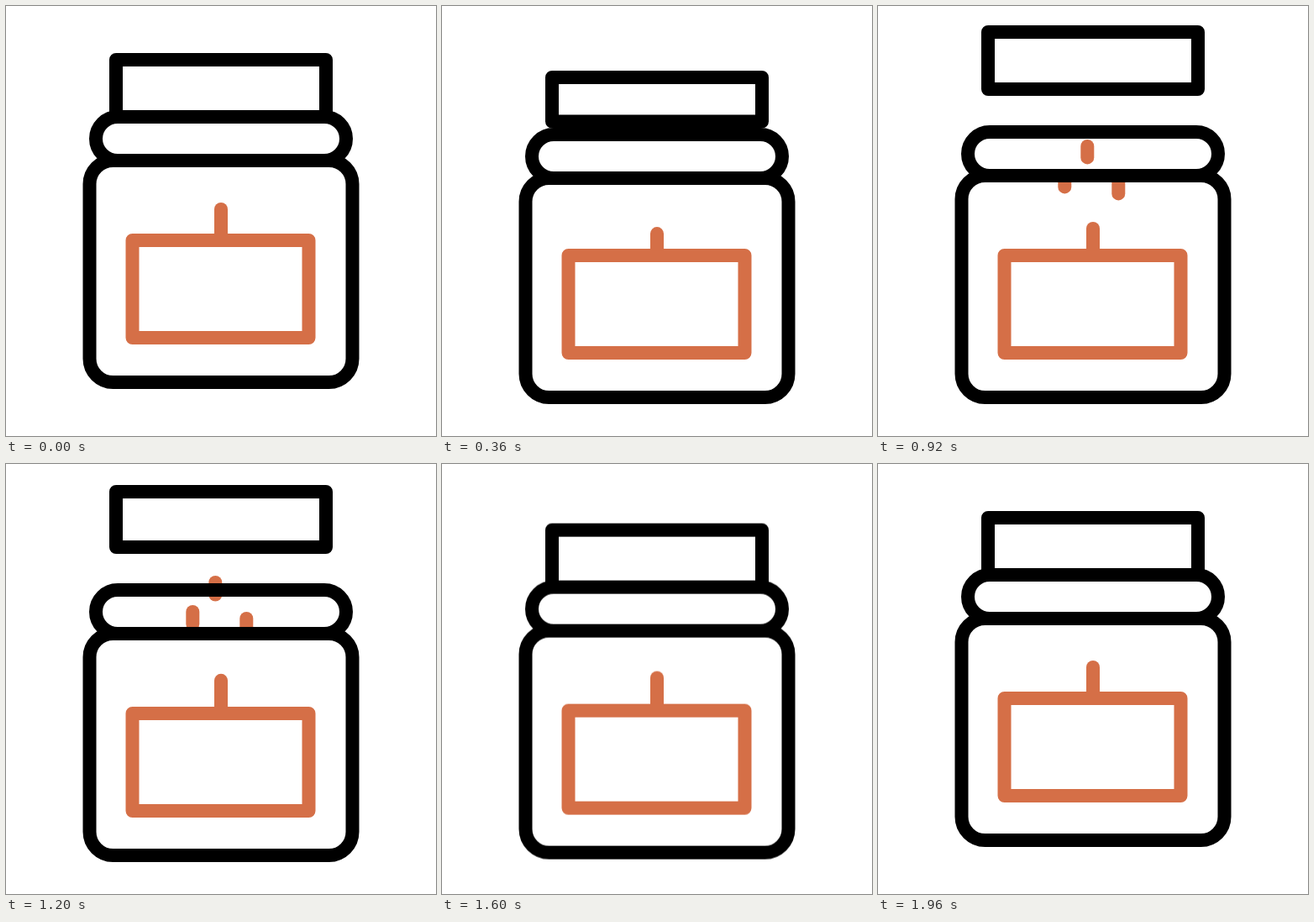
These frames come from a looping animation (512x512 px, 2 s). An HTML page:

```html
<!DOCTYPE html>
<html lang="en">
<head>
<meta charset="utf-8">
<title>Jar</title>
<style>
  @property --shift { syntax: "<length>"; inherits: true; initial-value: 0px; }
  @property --press { syntax: "<length>"; inherits: true; initial-value: 0px; }
  @property --lid-top { syntax: "<length>"; inherits: true; initial-value: 0px; }
  @property --lid-end { syntax: "<length>"; inherits: true; initial-value: 0px; }
  @property --wick { syntax: "<length>"; inherits: true; initial-value: 0px; }
  @property --head { syntax: "<length>"; inherits: true; initial-value: 0px; }
  @property --tail { syntax: "<length>"; inherits: true; initial-value: 0px; }

  html, body { margin: 0; width: 100%; height: 100%; overflow: hidden; background: #fff; }

  svg {
    --smooth: cubic-bezier(.37, 0, .63, 1);
    display: block;
    width: 100%;
    height: 100%;
    animation: 2s var(--smooth) infinite;
    animation-name: shift, press, lid-top, lid-end, wick, head, tail;
  }

  .all { transform: translateY(var(--shift)); }
  .line { fill: none; stroke: #000; stroke-width: 16; stroke-linejoin: round; }
  .orange { stroke: #d56f47; }
  .solid { fill: #d56f47; }

  .lid {
    y: calc(64px + var(--lid-top));
    height: calc(68px + var(--lid-end) - var(--lid-top));
  }
  .neck { y: calc(132px + var(--press)); }
  .body {
    y: calc(184px + var(--press));
    height: calc(264px - var(--press));
  }
  .wick {
    y: calc(234px + var(--wick));
    height: calc(45px - var(--wick));
  }
  .drop {
    y: calc(var(--base) - 8px - var(--head));
    height: calc(16px + var(--head) - var(--tail));
  }
  .drops { opacity: 0; animation: show 2s step-end infinite; }

  /* The whole jar sinks, then rises back */
  @keyframes shift {
    0%, 89.5%, 100% { --shift: 0px; }
    12%, 76.25% { --shift: 18px; }
  }
  /* Squash of the glass before the lid pops */
  @keyframes press {
    0%, 21%, 100% { --press: 0px; }
    12% { --press: 12.5px; }
  }
  /* The two edges of the lid move apart in time */
  @keyframes lid-top {
    0%, 74%, 100% { --lid-top: 0px; }
    12% { --lid-top: 38px; }
    26%, 58% { --lid-top: -51px; }
  }
  @keyframes lid-end {
    0%, 75.25%, 100% { --lid-end: 0px; }
    12% { --lid-end: 12.5px; }
    26%, 60.25% { --lid-end: -51px; }
  }
  @keyframes wick {
    0%, 9%, 90%, 100% { --wick: 0px; }
    22% { --wick: 14px; }
    70% { --wick: -4px; }
  }
  /* Drops grow at the head and shrink at the tail */
  @keyframes head {
    0%, 21.5% { --head: 0px; animation-timing-function: linear; }
    59%, 100% { --head: 75px; }
  }
  @keyframes tail {
    0%, 26% { --tail: 0px; animation-timing-function: linear; }
    68.25%, 100% { --tail: 75px; }
  }
  @keyframes show {
    0%, 69%, 100% { opacity: 0; }
    21.5% { opacity: 1; }
  }
</style>
</head>
<body>
<svg viewBox="0 0 512 512">
  <g class="all">
    <g class="drops solid">
      <rect class="drop" x="214.3" width="16" rx="8" style="--base: 233px"/>
      <rect class="drop" x="241.3" width="16" rx="8" style="--base: 198px"/>
      <rect class="drop" x="278.3" width="16" rx="8" style="--base: 241px"/>
    </g>
    <rect class="wick solid" x="248" width="16" rx="8"/>
    <rect class="line orange" x="150.5" y="279" width="210" height="116"/>
    <rect class="line lid" x="131" width="250"/>
    <rect class="line neck" x="107" width="298" height="52" rx="26"/>
    <rect class="line body" x="99.5" width="313" rx="28"/>
  </g>
</svg>
</body>
</html>
```
